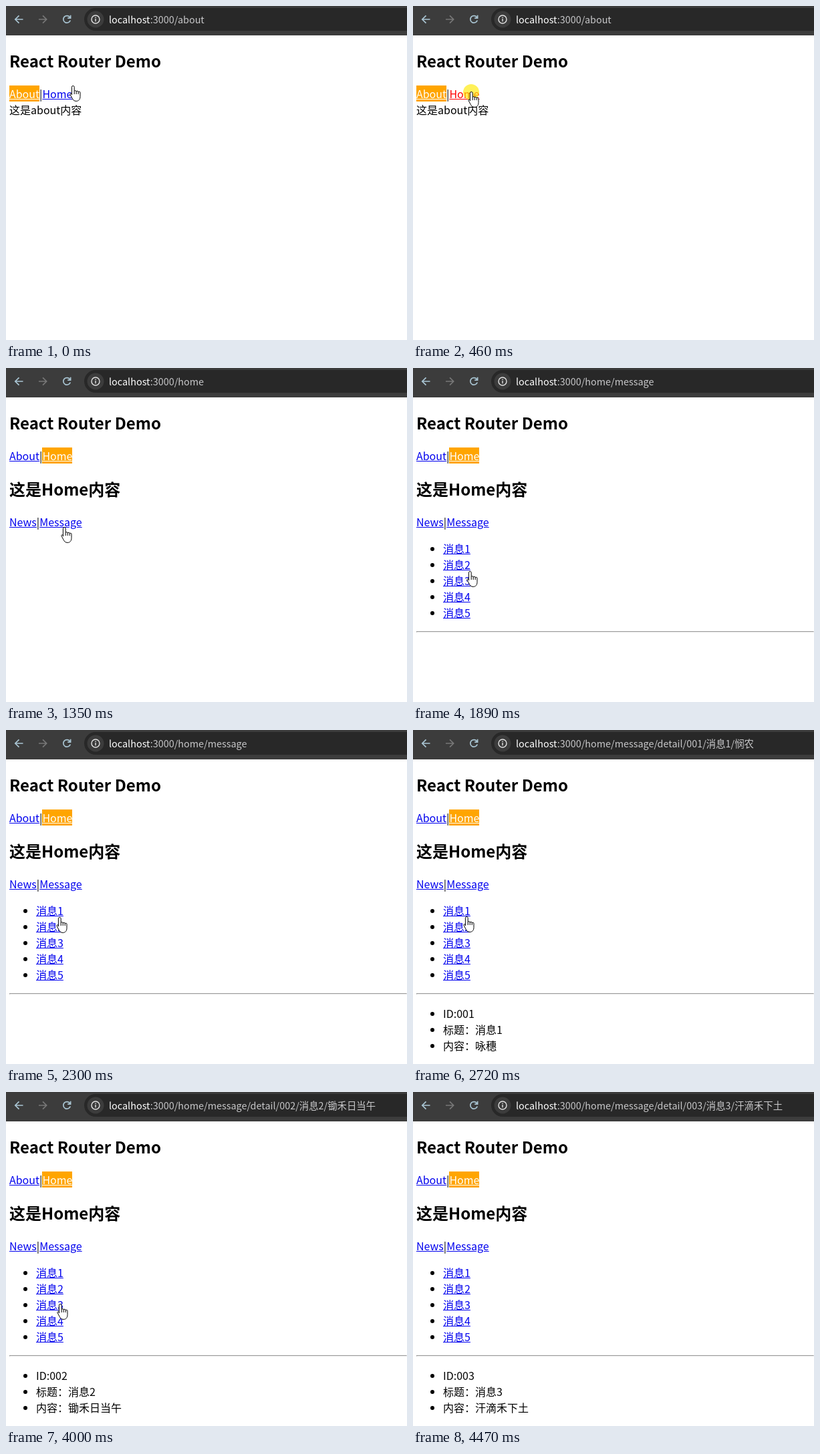
An HTML page that plays this animation: 600 px wide and 500 px high, repeating every 4940 ms.

```html
<!DOCTYPE html>
<html lang="zh-CN">
<head>
<meta charset="utf-8">
<title>React Router Demo</title>
<style>
  html, body { margin: 0; width: 100%; height: 100%; overflow: hidden; background: #fff; }
  body { position: relative; font: 16px/24px "Noto Sans CJK SC", "Noto Sans CJK", sans-serif; color: #000; }
  #bar { position: absolute; left: 0; top: 0; width: 600px; height: 44px; background: #3c3c3c; }
  #url { position: absolute; left: 154px; top: 8px; font-size: 14.4px; white-space: nowrap; color: #c7c7c9; }
  #url b { font-weight: 400; color: #fff; }
  #page { position: absolute; left: 5px; right: 0; top: 44px; height: 456px; overflow: hidden; white-space: nowrap; }
  h2 { font-size: 24px; line-height: 35px; margin: 20px 0; }
  ul { margin: 16px 0; padding-left: 40px; }
  hr { margin: 16px 0; }
  a { color: #00e; text-decoration: underline; }
  a.active { background: orange; color: #fff; }
  a.pressed { color: #f00; }
  #pointer { position: absolute; left: 0; top: 0; }
</style>
</head>
<body>
<svg id="bar" viewBox="0 0 600 44" fill="none" stroke-width="1.7">
  <rect x="117" y="3" width="520" height="34" rx="17" fill="#282828"/>
  <circle cx="134" cy="20" r="12.5" fill="#3c3c3c"/>
  <g stroke="#a9c5d3">
    <path d="M25.5 20H14M19.5 14.3L13.8 20l5.7 5.7"/>
    <path d="M95.6 17A5.3 5.3 0 1 0 96.2 21.4M96.6 13.8v4.4h-4.4"/>
  </g>
  <path d="M49 20h11.5M55 14.3l5.7 5.7-5.7 5.7" stroke="#777"/>
  <g stroke="#e3e3e3" stroke-width="1.4">
    <circle cx="134" cy="20" r="6"/>
    <path d="M134 19v4.2M134 16.6v1.5"/>
  </g>
</svg>
<div id="url"></div>
<div id="page"></div>
<svg id="pointer" width="600" height="500" stroke-linejoin="round">
  <g id="cursor">
    <circle id="halo" cy="1" r="12" fill="#ffe900" fill-opacity=".65"/>
    <g id="hand" transform="translate(-5.2)" fill="#fff" stroke="#000">
      <path d="M3.6 14V2.4a1.9 1.9 0 0 1 3.8 0v6.1a1.6 1.6 0 0 1 3 .5 1.6 1.6 0 0 1 3 .9 1.5 1.5 0 0 1 2.8.9v5.7c0 4-2 6.9-5.9 6.9-3.2 0-4.8-1.6-6-4.2l-3-5.6c-.7-1.6 1-2.6 2.3-1z"/>
      <path d="M7.4 8.5v4.5M10.4 9v4M13.4 10v3" fill="none"/>
    </g>
    <path id="arrow" d="M.5.5v16l3.8-3.6 2.5 5.8 2.4-1-2.5-5.7h5.2z" fill="#fff" stroke="#000"/>
  </g>
</svg>
<script>
const LOOP = 4940, CURSOR_GONE = 4470;
const $ = id => document.getElementById(id);

const routes = [
  [0, 'about'],
  [540, 'home'],
  [1680, 'home/message'],
  [2720, 'home/message/detail/001/消息1/悯农', 1, '咏穗'],
  [3600, 'home/message/detail/002/消息2/锄禾日当午', 2, '锄禾日当午'],
  [4270, 'home/message/detail/003/消息3/汗滴禾下土', 3, '汗滴禾下土'],
];

// press time, release time, link label
const presses = [
  [400, 540, 'Home'], [1550, 1680, 'Message'], [2560, 2720, '消息1'],
  [3460, 3600, '消息2'], [4130, 4270, '消息3'],
];

// first step, last step, number of steps, destination x, y
const moves = [
  [70, 190, 3, 87, 128],
  [600, 870, 5, 102, 225],
  [940, 1140, 4, 82, 261], [1210, 1350, 3, 87, 238],
  [1690, 1890, 4, 85, 304], [1960, 2030, 2, 81, 293],
  [2090, 2490, 6, 79, 266],
  [2720, 2720, 1, 80, 279], [2790, 2930, 3, 79, 292],
  [3670, 3870, 4, 81, 315], [4000, 4000, 1, 81, 317],
  [4340, 4400, 2, 83, 322],
];

function cursorAt(t) {
  let x = 100, y = 119;
  for (const [start, end, steps, toX, toY] of moves) {
    if (t < start) break;
    const step = t >= end ? steps : 1 + Math.floor((t - start) / (end - start) * (steps - 1));
    x += (toX - x) * step / steps;
    y += (toY - y) * step / steps;
  }
  return [x, y];
}

function pageHtml([, path, id, content], pressed) {
  const link = (label, active) =>
    `<a class="${active ? 'active' : label === pressed ? 'pressed' : ''}">${label}</a>`;
  const list = items => `<ul>${items.map(item => `<li>${item}</li>`).join('')}</ul>`;
  const about = path === 'about';
  let html = `<h2>React Router Demo</h2><div>${link('About', about)}|${link('Home', !about)}</div>`;
  if (about) return html + '<div>这是about内容</div>';
  html += `<h2>这是Home内容</h2><div>${link('News')}|${link('Message')}</div>`;
  if (path.includes('message')) html += list([1, 2, 3, 4, 5].map(n => link('消息' + n))) + '<hr>';
  if (id) html += list([`ID:00${id}`, `标题：消息${id}`, `内容：${content}`]);
  return html;
}

const show = (id, visible) => $(id).style.display = visible ? '' : 'none';
let shown = '';

function draw() {
  const t = performance.now() % LOOP;
  const route = routes.filter(r => r[0] <= t).pop();
  const press = presses.find(([down, up]) => t >= down && t < up);
  const key = route[1] + (press ? press[2] : '');
  if (key !== shown) {
    shown = key;
    $('url').innerHTML = `<b>localhost</b>:3000/${route[1]}`;
    $('page').innerHTML = pageHtml(route, press && press[2]);
  }
  const [x, y] = cursorAt(t).map(Math.round);
  const offLink = (y > 143 && y < 218) || (y > 242 && y < 258);
  $('cursor').setAttribute('transform', `translate(${x} ${y})`);
  show('cursor', t < CURSOR_GONE);
  show('halo', press);
  show('hand', !offLink);
  show('arrow', offLink);
  requestAnimationFrame(draw);
}
draw();
</script>
</body>
</html>
```
